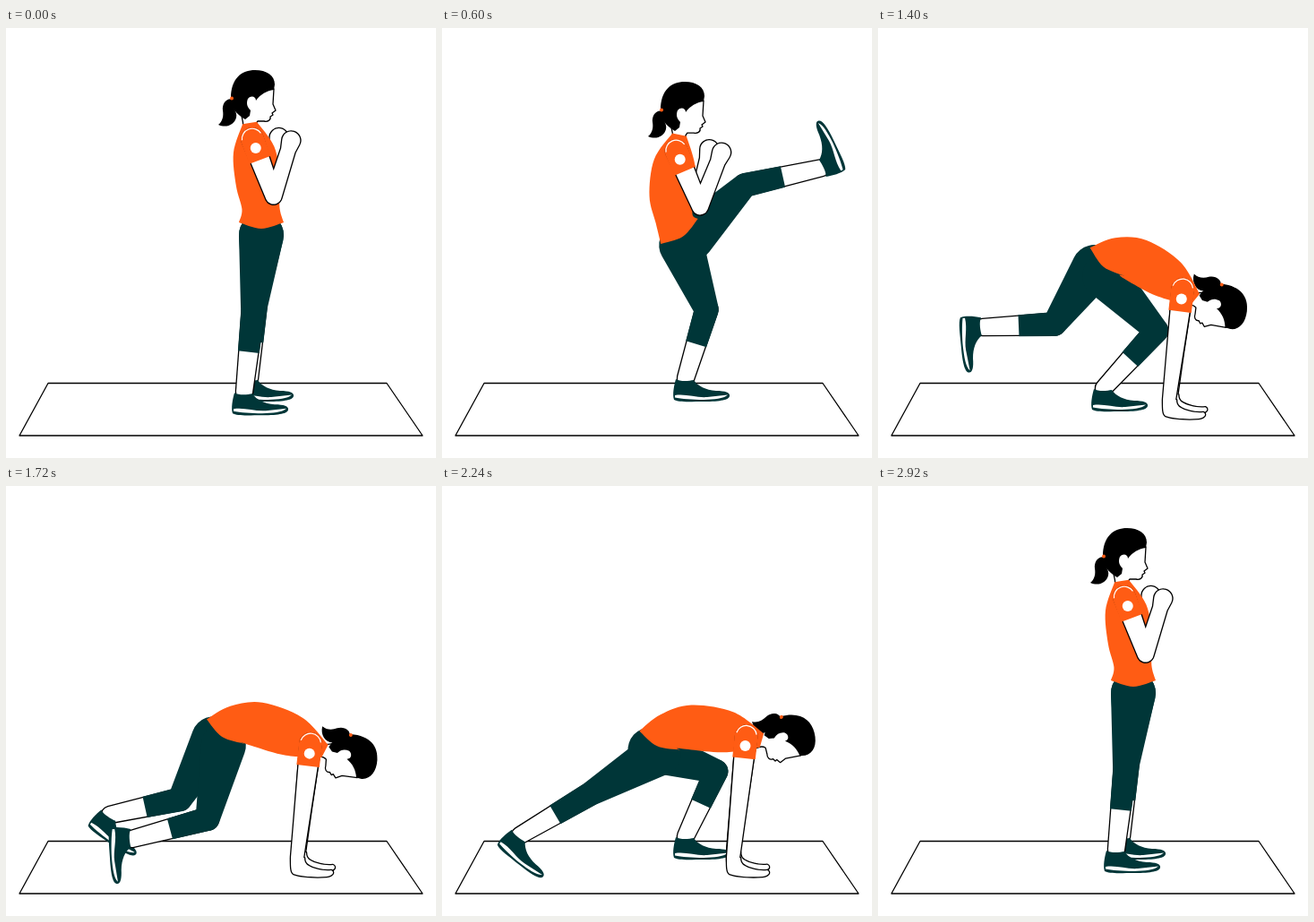
These frames come from a looping animation (480 px wide and 480 px high, 2960 ms). An HTML page:

```html
<!DOCTYPE html>
<html lang="en">
<head>
<meta charset="utf-8">
<title>Kick and step-back exercise</title>
<style>
  html, body { margin: 0; width: 100%; height: 100%; overflow: hidden; background: #fff; }
  svg { display: block; width: 100%; height: 100%; }
  .skin { fill: #fff; stroke: #000; stroke-width: 2.6; paint-order: stroke; stroke-linejoin: round; }
  .line { fill: none; stroke: #000; stroke-width: 1.3; stroke-linejoin: round; stroke-linecap: round; }
  .cloth { fill: #003638; }
  .shirt { fill: #ff5c14; }
  .seam { fill: none; stroke: #fff; stroke-width: 1.2; }
  .white { fill: #fff; }
</style>
</head>
<body>
<svg viewBox="0 0 480 480">
  <defs>
    <g id="shoe">
      <path class="cloth" d="M-11 1C-6 4 4 3 9 2C14 9 22 13 34 14C44 14 50 16 49 20C48 24 40 26 20 26C5 26-8 27-13 24C-15 18-13 8-11 1Z"/>
      <path class="white" d="M-12 19C0 17 12 22 24 21L47 18.5C42 23 32 23.5 20 24C8 24-5 23-12 21.5Z"/>
    </g>
  </defs>
  <path class="line" d="M47 396.500H425L465 455H15Z"/>
  <path id="farArm" class="skin"/>
  <g id="farLeg"><path class="skin"/><use href="#shoe"/><path class="cloth"/></g>
  <g id="nearLeg"><path class="skin"/><use href="#shoe"/><path class="cloth"/></g>
  <g id="head">
    <path class="white" d="M262 96L266 60L298 66L297 84L300 92L296 98L290 103L280 103L279 113L264 112Z"/>
    <path class="line" d="M298 67L297 84L300 91L296 94L297 96L294 98C295 102 291 104 287 103L280 103C277 106 277 109 278 113M262 97Q264 104 264 112"/>
    <path d="M250 78C250 55 262 46 277 46C290 46 299 52 299 62L298 68C290 69 283 73 278 80C278 75 272 74 269 78C267 83 268 87 272 91L271 97L266 101C256 95 250 88 250 78Z"/>
    <path id="tail" d="M253 79C245 76 240 84 241 91C242 97 241 103 236 107C245 111 254 107 256 99C258 92 250 88 253 79Z"/>
    <circle class="shirt" cx="251" cy="77.500" r="2"/>
  </g>
  <path id="torso" class="shirt"/>
  <path id="nearArm" class="skin"/>
  <path id="sleeve" class="shirt"/>
  <path id="seam" class="seam"/>
  <circle id="badge" class="white" r="6"/>
</svg>
<script>
const LOOP = 2960;
const $ = id => document.getElementById(id);
const rad = deg => deg * Math.PI / 180;

// A pose is the waist, its tilt, the neck, the turn of head and ponytail,
// and how far the hands have gone from guard (0) to the floor (1).
const pose = (waistX, waistY, tilt, neckX, neckY, turn, tail, planted) =>
  ({ waistX, waistY, tilt, neckX, neckY, turn, tail, planted });
const stand = pose(285, 217, 0, 272, 106, 0, 0, 0);
const kick = pose(265, 227, -34, 265, 119, 0, 0, 0);
const bow = pose(255, 218, 13, 350, 170, 68, 30, 0);
const lunge = pose(256, 261, 39, 354, 303, 97, -13, 1);
const plank = pose(245, 274, 33, 356, 296, 94, -14, 1);
const step = pose(243, 284, 25, 357, 284, 76, -22, 1);
const timeline = [
  [0, stand], [600, kick], [960, bow], [1330, lunge], [1400, lunge], [1720, plank],
  [2240, step], [2620, bow], [2830, stand], [LOOP, stand]
];

// Feet rest at [x, y, turn] and travel in arcs between the resting places.
const nearLeg = {
  id: 'nearLeg', side: 1, size: .99, home: [266, 406, 0],
  moves: [
    { from: 0, to: 600, foot: [423, 156, -115], lift: -45 },
    { from: 600, to: 960, foot: [252, 402, 0], lift: -45 },
    { from: 1480, to: 1870, foot: [87, 390, 39], roll: 65 },
    { from: 2260, to: 2540, foot: [266, 406, 0], lift: 10 }
  ]
};
const farLeg = {
  id: 'farLeg', side: -1, size: .91, home: [272, 391, 0],
  moves: [
    { from: 1140, to: 1400, foot: [117, 334, 85] },
    { from: 1400, to: 1580, foot: [116, 367, 35] },
    { from: 1880, to: 2200, foot: [272, 391, 0], lift: 10 }
  ]
};

const FLOOR_WRIST = [325, 415];
const GUARD_WRIST = [43, 30];
// Torso half-width at points along the spine, from waist to neck
const GIRTH = [[0, 25], [.22, 21], [.5, 25], [.8, 23], [1, 8]];

const smooth = u => u * u * (3 - 2 * u);
const polar = (p, angle, r) => [p[0] + r * Math.cos(angle), p[1] + r * Math.sin(angle)];
const heading = (a, b) => Math.atan2(b[1] - a[1], b[0] - a[0]);
const distance = (a, b) => Math.hypot(b[0] - a[0], b[1] - a[1]);
const mix = (a, b, u) => a.map((v, i) => v + (b[i] - v) * u);
const add = (a, b) => a.map((v, i) => v + b[i]);
const rotate = ([x, y], a) => [x * Math.cos(a) - y * Math.sin(a), x * Math.sin(a) + y * Math.cos(a)];
const fmt = p => p.map(v => v.toFixed(2)).join(' ');

// Monotone cubic interpolation: smooth, but never past a pose.
function poseAt(t) {
  const last = timeline.length - 1;
  let i = 0;
  while (i < last - 1 && timeline[i + 1][0] <= t) i++;
  const [t0, a] = timeline[i], [t1, b] = timeline[i + 1];
  const span = t1 - t0, u = (t - t0) / span;
  const slope = (j, key) => (timeline[j + 1][1][key] - timeline[j][1][key]) /
    (timeline[j + 1][0] - timeline[j][0]);
  const tangent = (j, key) => {
    if (j === 0 || j === last) return 0;
    const before = slope(j - 1, key), after = slope(j, key);
    return before * after > 0 ? 2 * before * after / (before + after) : 0;
  };
  const result = {};
  for (const key in a) {
    result[key] = a[key] + (b[key] - a[key]) * smooth(u) +
      span * u * (1 - u) * (tangent(i, key) * (1 - u) - tangent(i + 1, key) * u);
  }
  return result;
}

function footAt({ home, moves }, t) {
  let foot = home;
  for (const { from, to, foot: goal, lift = 0, roll = 0 } of moves) {
    if (t <= from) break;
    const u = Math.min(1, (t - from) / (to - from)), arc = Math.sin(Math.PI * u);
    foot = add(mix(foot, goal, smooth(u)), [0, -lift * arc, roll * arc]);
  }
  return foot;
}

// Middle joint of a two-part limb, stretched straight when the end is out of reach
function joint(a, b, upper, lower, side) {
  const d = distance(a, b), dir = heading(a, b), reach = upper + lower;
  if (d >= reach) return mix(a, b, upper / reach);
  const along = (upper ** 2 - lower ** 2 + d * d) / (2 * d);
  const bend = Math.sqrt(Math.max(0, upper ** 2 - along ** 2));
  return polar(polar(a, dir, along), dir + side * Math.PI / 2, bend);
}

function capsule(a, ra, b, rb) {
  const base = heading(a, b);
  const ratio = (ra - rb) / Math.max(distance(a, b), .01);
  const off = Math.acos(Math.max(-1, Math.min(1, ratio)));
  const wide = off > Math.PI / 2 ? 1 : 0;
  return `M${fmt(polar(a, base + off, ra))}L${fmt(polar(b, base + off, rb))}` +
    `A${rb} ${rb} 0 ${wide} 0 ${fmt(polar(b, base - off, rb))}` +
    `L${fmt(polar(a, base - off, ra))}A${ra} ${ra} 0 ${1 - wide} 0 ${fmt(polar(a, base + off, ra))}Z`;
}

function taper(a, ra, b, rb) {
  const side = heading(a, b) + Math.PI / 2;
  const corners = [polar(a, side, ra), polar(b, side, rb), polar(b, side, -rb), polar(a, side, -ra)];
  return 'M' + corners.map(fmt).join('L') + 'Z';
}

function spline(points) {
  const at = i => points[Math.max(0, Math.min(points.length - 1, i))];
  const handle = (p, a, b) => [p[0] + (b[0] - a[0]) / 6, p[1] + (b[1] - a[1]) / 6];
  return points.slice(1).map((p, i) =>
    `C${fmt(handle(at(i), at(i - 1), p))} ${fmt(handle(p, at(i + 2), at(i)))} ${fmt(p)}`).join('');
}

function torsoPath(waist, bulge, neck, tilt) {
  const edge = side => GIRTH.map(([u, half]) => {
    const a = mix(waist, bulge, u), b = mix(bulge, neck, u);
    return polar(mix(a, b, u), heading(a, b) + side * Math.PI / 2, half);
  });
  const back = edge(-1).reverse(), front = edge(1);
  const hem = [back[4], polar(waist, tilt + Math.PI / 2, 7), front[0]];
  return 'M' + fmt(back[0]) + spline(back) + spline(hem) + spline(front) + 'Z';
}

function drawLeg(leg, waist, tilt, t) {
  const [x, y, turn] = footAt(leg, t);
  const ankle = [x, y];
  const spread = leg.side * 12 * Math.abs(Math.sin(tilt));
  const hip = polar(polar(waist, tilt + Math.PI / 2, 14), tilt, spread);
  const knee = joint(hip, ankle, 85 * leg.size, 88 * leg.size, -1);
  const [skin, shoe, pants] = $(leg.id).children;
  skin.setAttribute('d', capsule(knee, 12, ankle, 9));
  shoe.setAttribute('transform', `translate(${fmt(ankle)}) rotate(${turn})`);
  pants.setAttribute('d', capsule(hip, 25, knee, 13.5) + taper(knee, 13.5, mix(knee, ankle, .5), 12));
}

function armPath(shoulder, elbow, wrist, flat) {
  const [x, y] = wrist;
  const hand = flat
    ? `M${x - 7} ${y}c0 10 0 16 3 18c8 3 24 4 37 3c7-1 9-5 5-7c-10 1-20-2-25-5c-4-2-5-6-5-9Z`
    : capsule(wrist, 8, polar(wrist, heading(elbow, wrist), 11), 10);
  return capsule(shoulder, 11.5, elbow, 9) + capsule(elbow, 9, wrist, flat ? 7 : 8) + hand;
}

function drawArms(shoulder, neck, turn, planted) {
  const flat = planted > .5;
  const wrist = mix(add(neck, rotate(GUARD_WRIST, turn)), FLOOR_WRIST, planted);
  const elbow = joint(shoulder, wrist, 68, 54, 1);
  const shift = rotate([-12, -3], turn).map(v => v * (1 - planted / 2));
  $('nearArm').setAttribute('d', armPath(shoulder, elbow, wrist, flat));
  $('farArm').setAttribute('d',
    armPath(shoulder, add(elbow, shift.map(v => v * .3)), add(wrist, shift), flat));

  const dir = heading(shoulder, elbow);
  $('sleeve').setAttribute('d', capsule(shoulder, 13, polar(shoulder, dir, 5), 13) +
    taper(shoulder, 13, polar(shoulder, dir, 25), 12.8));
  $('seam').setAttribute('d', `M${fmt(polar(shoulder, dir + 1.8, 11.5))}` +
    `A11.5 11.5 0 0 1 ${fmt(polar(shoulder, dir - 1.8, 11.5))}`);
  const [x, y] = polar(shoulder, dir, 11);
  $('badge').setAttribute('cx', x);
  $('badge').setAttribute('cy', y);
}

function draw(t) {
  const p = poseAt(t);
  const waist = [p.waistX, p.waistY], neck = [p.neckX, p.neckY], tilt = rad(p.tilt);
  const bulge = polar(waist, tilt - Math.PI / 2, distance(waist, neck) * .28);
  const shoulder = polar(neck, heading(neck, bulge), 18);

  $('torso').setAttribute('d', torsoPath(waist, bulge, neck, tilt));
  $('head').setAttribute('transform', `translate(${fmt(neck)}) rotate(${p.turn}) translate(-271 -105)`);
  $('tail').setAttribute('transform', `rotate(${p.tail} 251 78)`);
  drawArms(shoulder, neck, rad(p.turn), p.planted);
  drawLeg(farLeg, waist, tilt, t);
  drawLeg(nearLeg, waist, tilt, t);
}

const start = performance.now();
function tick() {
  draw((performance.now() - start) % LOOP);
  requestAnimationFrame(tick);
}
draw(0);
requestAnimationFrame(tick);
</script>
</body>
</html>
```
